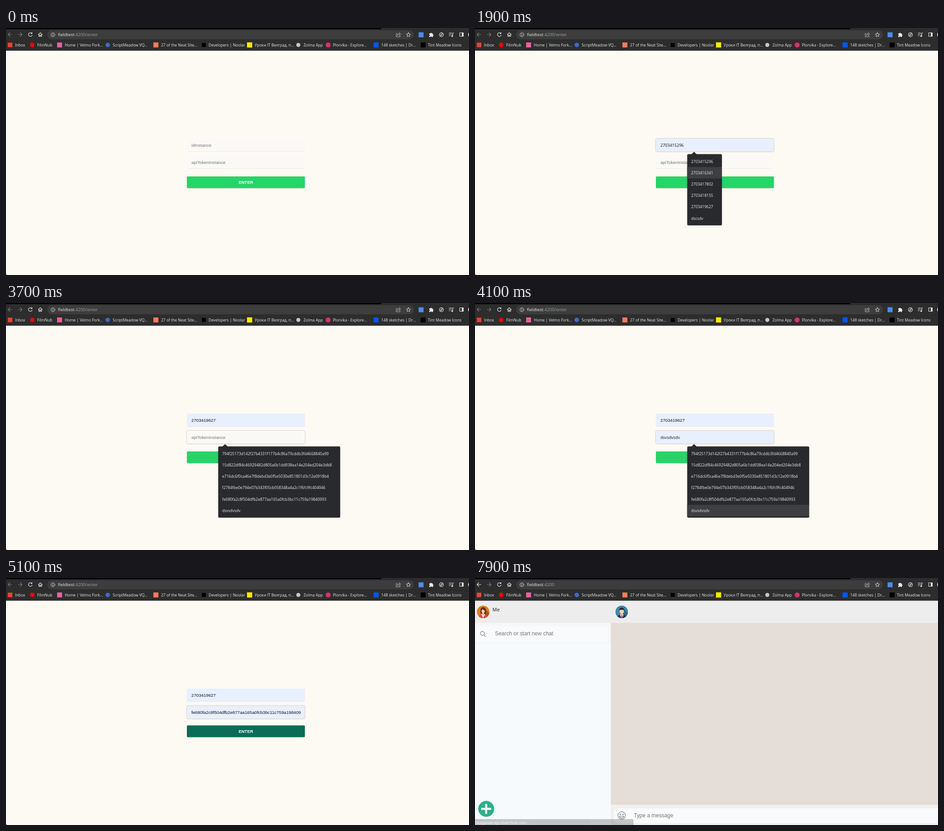
These frames come from a looping animation (1024x547 px, 8 s). An HTML page:

```html
<!DOCTYPE html>
<html lang="en">
<head>
<meta charset="utf-8">
<title>Sign in</title>
<style>
  html, body { margin: 0; width: 100%; height: 100%; overflow: hidden; background: #fdf9f3; }
  svg { display: block; width: 100%; height: 100%; }
  text { font-family: "Liberation Sans", Arial, sans-serif; white-space: pre; }
  .ui { font-family: "Open Sans", "Noto Sans", sans-serif; font-size: 8.5px; fill: #e8eaed; }
  .url { font-size: 9.6px; }
  .me { font-size: 11px; fill: #222; }
  .dim { fill: #9aa0a6; }
  .field { font-size: 9.7px; fill: #757575; }
  .field.filled { fill: #111; }
  .field.preview { font-family: "Open Sans", "Noto Sans", sans-serif; font-size: 9.05px; }
  .box { filter: drop-shadow(0 .7px .7px #0003); }
  .box.focus { filter: drop-shadow(0 .4px 1.1px #0006); }
  .chat { font-size: 11.9px; fill: #757575; }
  .line { fill: none; stroke: #dfe1e5; stroke-width: 1.2; stroke-linecap: round; stroke-linejoin: round; }
  .grey { stroke: #777; }
  .popup { transform-box: fill-box; transform-origin: center; filter: drop-shadow(0 .8px 1px #0006); }
</style>
</head>
<body>
<svg viewBox="0 0 1024 547">
  <defs>
    <clipPath id="inner"><rect x="409" y="240" width="243" height="80"/></clipPath>
    <clipPath id="round"><circle r="14"/></clipPath>
  </defs>

  <g id="login">
    <rect width="1024" height="547" fill="#fdf9f3"/>
    <circle cx="0" cy="547" r="2.5" fill="#999"/>
    <rect class="box" x="400" y="245" width="261" height="28.5" rx="2.5"/>
    <rect class="box" x="400" y="283" width="261" height="28.5" rx="2.5"/>
    <g clip-path="url(#inner)">
      <text class="field" x="410" y="262.5"></text>
      <text class="field" x="410" y="300.5"></text>
    </g>
    <g id="button">
      <rect class="box" x="400" y="328.8" width="261" height="26" rx="2"/>
      <text x="530.5" y="345" text-anchor="middle" font-size="9.5" font-weight="bold" fill="#fff">ENTER</text>
    </g>
    <g id="popups"></g>
  </g>

  <g id="home">
    <rect width="1024" height="547" fill="#ededed"/>
    <rect y="99.5" width="300.5" height="448" fill="#f7fafc"/>
    <rect y="99.5" width="300.5" height="47.5" fill="#f5f7f9"/>
    <rect x="-10" y="107" width="304" height="34" rx="9" fill="#f8fafc"/>
    <rect x="300.5" y="99.5" width="724" height="402.5" fill="#e5ddd7"/>
    <rect x="300.5" y="502" width="724" height="45" fill="#f0f0f0"/>
    <rect x="307" y="510" width="740" height="33" rx="9" fill="#f8fafc"/>
    <text id="me" class="ui me" y="73.5">Me</text>
    <text id="search" class="chat" y="127">Search or start new chat</text>
    <text id="message" class="chat" y="529.5">Type a message</text>
    <g id="icons">
      <g transform="translate(18 75)" clip-path="url(#round)">
        <circle r="14" fill="#d9822b"/>
        <path d="M3-8 16 5V16H-2Z" fill="#a8501e"/>
        <path d="M-6 4V-4A6 6.5 0 0 1 6-4V4Z" fill="#6e2a1c"/>
        <path d="M-10 16Q-10 6-3 5H3Q10 6 10 16Z" fill="#e0443c"/>
        <path d="M-4 5 0 14 4 5Z" fill="#fff"/>
        <path d="M-2 1H2V6L0 8-2 6Z" fill="#e5b38f"/>
        <ellipse cy="-2" rx="3.7" ry="4.8" fill="#f6cfad"/>
        <path d="M-4-3Q-3-8 1-7.5 4-7 4-3 0-4-1-6-2-4-4-3Z" fill="#6e2a1c"/>
      </g>
      <g transform="translate(324.5 75)" clip-path="url(#round)">
        <circle r="14" fill="#3f87a5"/>
        <path d="M4-7 16 5V16H0Z" fill="#2f6c88"/>
        <path d="M-10 16Q-10 7-4 6H4Q10 7 10 16Z" fill="#253b58"/>
        <path d="M-4 5.5 0 16 4 5.5Z" fill="#fff"/>
        <path d="M-1.3 7H1.3L2 15H-2Z" fill="#a8538c"/>
        <path d="M-2.5 2H2.5V6L0 8-2.5 6Z" fill="#e5b38f"/>
        <ellipse cy="-1.5" rx="5" ry="5.7" fill="#f6cfad"/>
        <path d="M-5.5-1Q-7-9 0-9.5 7-9 5.5-1L4-4.5H-4Z" fill="#2a2a30"/>
      </g>
      <g class="line grey">
        <circle cx="16.2" cy="122.8" r="4.4"/>
        <path d="m19.5 126 3.5 3.6"/>
      </g>
      <circle cx="24.8" cy="511.2" r="17.6" fill="#2cb08e"/>
      <path d="M13.8 511.2h22m-11-11v22" stroke="#fff" stroke-width="4.4"/>
      <g class="line grey">
        <circle cx="324.4" cy="526" r="8.4"/>
        <path d="M319.5 527.5h9.8q-1 4-4.9 4t-4.9-4Z"/>
        <path d="M321.3 523.3v.4m6.2-.4v.4" stroke-width="2.4"/>
      </g>
    </g>
    <g id="status">
      <path d="M0 534H347.5q3 0 3 3V547H0Z"/>
      <text class="ui" x="-3.5" y="545">Ожидание api.olvet-hub.com...</text>
    </g>
  </g>

  <rect width="1024" height="50.3" fill="#2d2d2d"/>
  <rect width="830" height="2.5"/>
  <rect x="91" y="5" width="811" height="20" rx="10" fill="#3d3d3d"/>
  <text class="ui url" x="115" y="18.3">fieldtest<tspan class="dim" id="path"></tspan></text>
  <g class="line">
    <path id="back" d="M13 14.5H4.5m4-4-4 4 4 4"/>
    <path d="M27 14.5h8.5m-4-4 4 4-4 4" stroke="#77797c"/>
    <path d="M57 11.8a4.1 4.1 0 1 0 .8 4m-.3-6v2.7h-2.7"/>
    <path d="M71.5 14.5 75.8 10.5 80.1 14.5M72.8 14v4.7h2v-3h2v3h2V14"/>
    <circle cx="103.8" cy="15" r="4.2" stroke-width="1"/>
    <path d="M103.8 14.7v2.3m0-4.2v.1"/>
    <path d="M865 12h-2v7.5h8.5V17M865.5 16.5q.5-4 4.5-4.3v-2l3 3.2-3 3.2v-2q-3-.2-4.5 1.9Z" stroke-width="1" stroke="#b4b7bb"/>
    <path d="m890 10.2 1.4 3 3.3.4-2.4 2.2.6 3.2-2.9-1.6-2.9 1.6.6-3.2-2.4-2.2 3.3-.4Z" stroke-width="1"/>
    <circle cx="963" cy="14.8" r="4.5"/>
    <path d="M961 17q-.5-4 4.2-4.5Q965.5 17 961 17l2.6-2.5" stroke-width="1"/>
    <path d="M980 11h6m-6 3h6m-6 3h3m5 1v-7h2"/>
    <circle cx="986.7" cy="18" r="1.2" fill="#dfe1e5"/>
    <rect x="1003.5" y="10.5" width="8" height="8"/>
  </g>
  <path d="M1008 10h4v9h-4Z" fill="#dfe1e5"/>
  <path d="M936 12h2.5a1.5 1.5 0 0 1 3 0h2.5v2.5a1.5 1.5 0 0 1 0 3V20h-2.6a1.4 1.4 0 0 0-2.8 0H936v-2.5a1.4 1.4 0 0 0 0-2.8Z" fill="#e8eaed"/>
  <rect x="912.5" y="9.5" width="11" height="11" fill="#4d8bf0"/>
  <circle cx="1028" cy="14.8" r="6" fill="#c8cacd"/>
  <g id="bookmarks"></g>
</svg>
<script>
const $ = id => document.getElementById(id);
const all = sel => [...document.querySelectorAll(sel)];
const LOOP = 8000, STEP = 100, ROW = 25.2;

// icon x, icon size, colour, round?, label x, label
const bookmarks = [
  [4, 10, '#ea4335', 0, 20, 'Inbox'],
  [53, 10, '#f00', 1, 69, 'FilmNub'],
  [113, 11, '#ee5f9b', 0, 130, 'Home | Velmo Fork...'],
  [220, 10, '#3a6bc9', 1, 236, 'ScriptMeadow VQ...'],
  [326, 11, '#ff7a59', 0, 343, '27 of the Neat Site...'],
  [433, 9, '#000', 0, 448, 'Developers | Noolar'],
  [533, 11.5, '#f8ea00', 0, 550, 'Уроки IT Велград, п...'],
  [642, 9, '#c4c6c9', 1, 658, 'Zolma App'],
  [707, 11, '#d6336c', 1, 723, 'Plorvika - Explore...'],
  [813, 11, '#0057ff', 0, 830, '148 sketches | Dr...'],
  [917, 11, '#000', 0, 933, 'Tint Meadow Icons']
];
$('bookmarks').innerHTML = bookmarks.map(([x, size, color, round, tx, label]) =>
  `<rect x="${x}" y="${37.5 - size / 2}" width="${size}" height="${size}" rx="${round * size / 2}" fill="${color}"/>
   <text class="ui" x="${tx}" y="40.5">${label}</text>`).join('');

const lists = [
  ['2703415296', '2703416341', '2703417802', '2703418155', '2703419627', 'dscsdv'],
  ['794f25173d142f27b4331f177b4c86a79cddb3fd4668840a99',
   '15d822df84c46929482d805a6b1dd938ea14e204ed204e3db8',
   'e716dc6f0ca46e7f8debd3e0f5e5030e851801d3c12e0918b4',
   'f2784fbe0e794e07b343f05cb058348a4a2c1f6fc9fc404946',
   'fe680fa2c8f504dfb2e877aa165a0fcb3bc11c759a19840993',
   'dsvsdvsdv']
];
const hints = ['idInstance', 'apiTokenInstance'];

const popup = (rows, top, width) => `<g class="popup">
  <path d="M478.5 ${top + .5}l6-5.5 6 5.5Z" fill="#292a2d"/>
  <rect x="469.5" y="${top}" width="${width}" height="157.5" rx="2.5" fill="#292a2d"/>
  <rect class="hover" x="469.5" width="${width}" height="${ROW}" fill="#3e3f42"/>
  ${rows.map((s, i) => `<text class="ui" x="478" y="${top + 19 + i * ROW}">${s}</text>`).join('')}
</g>`;
const tops = [279.5, 317.7];
$('popups').innerHTML = popup(lists[0], tops[0], 76.5) + popup(lists[1], tops[1], 269.5);

const boxes = all('#login > .box'), fields = all('.field'), popups = all('.popup'), hovers = all('.hover');
const buttonBox = $('button').firstElementChild;

// Each step changes part of the state: values are row indexes, -1 is empty
const steps = [
  [0, { value: [-1, -1], preview: -1, focus: -1, open: 0, alpha: 0, row: -1 }],
  [1300, { focus: 0, alpha: .5 }],
  [1400, { alpha: 1 }],
  [1700, { row: 0 }],
  [1800, { value: [0, -1], preview: 0 }],
  [1900, { row: 1 }],
  [2000, { row: 2, value: [2, -1] }],
  [2100, { row: 3, value: [3, -1] }],
  [2300, { row: 4, value: [4, -1] }],
  [2600, { preview: -1 }],
  [2700, { alpha: .5 }],
  [2800, { alpha: 0 }],
  [2900, { focus: 1, row: -1 }],
  [3200, { open: 1, alpha: .5 }],
  [3300, { alpha: 1 }],
  [3800, { row: 0, value: [4, 0], preview: 1 }],
  [3900, { row: 2, value: [4, 2] }],
  [4000, { row: 4, value: [4, 4] }],
  [4100, { row: 5, value: [4, 5] }],
  [4200, { row: 4, value: [4, 4] }],
  [4500, { preview: -1 }],
  [4600, { alpha: .5 }],
  [4700, { alpha: 0 }]
];

const show = (el, on) => el.style.display = on ? '' : 'none';
const mix = (a, b, p) => `rgb(${a.map((v, i) => Math.round(v + (b[i] - v) * p))})`;

function drawLogin(t) {
  const s = Object.assign({}, ...steps.filter(([at]) => at <= t).map(([, patch]) => patch));
  fields.forEach((field, i) => {
    const filled = s.value[i] >= 0;
    field.textContent = filled ? lists[i][s.value[i]] : hints[i];
    field.classList.toggle('filled', filled);
    field.classList.toggle('preview', s.preview === i);
    boxes[i].classList.toggle('focus', s.focus === i);
    boxes[i].setAttribute('fill', filled ? '#e8f0fe' : '#fbf9f6');

    show(popups[i], s.open === i && s.alpha > 0);
    popups[i].style.opacity = s.alpha;
    popups[i].style.transform = `scale(${.95 + .05 * s.alpha})`;
    show(hovers[i], s.row >= 0);
    hovers[i].setAttribute('y', tops[i] + 3.2 + s.row * ROW);
  });
  const p = Math.min(1, Math.max(0, (t - 4800) / 300));
  buttonBox.setAttribute('fill', mix([39, 212, 103], [11, 108, 87], p));
  $('button').setAttribute('transform', `translate(0 ${-2.2 * p})`);
}

function drawHome(t) {
  const loaded = t >= 7700;
  show($('icons'), loaded);
  $('me').setAttribute('x', loaded ? 38.5 : 35.5);
  $('search').setAttribute('x', loaded ? 44.3 : 41.5);
  $('message').setAttribute('x', loaded ? 351.3 : 350.7);
  $('status').style.opacity = t < 7800 ? 1 : t < 7900 ? .6 : .21;
}

const start = performance.now();
function frame() {
  const t = Math.floor((performance.now() - start) % LOOP / STEP) * STEP;
  const home = t >= 7500;
  show($('login'), !home);
  show($('home'), home);
  $('path').textContent = home ? ':4200' : ':4200/enter';
  $('back').setAttribute('stroke', home ? '#dfe1e5' : '#77797c');
  (home ? drawHome : drawLogin)(t);
  requestAnimationFrame(frame);
}
frame();
</script>
</body>
</html>
```
